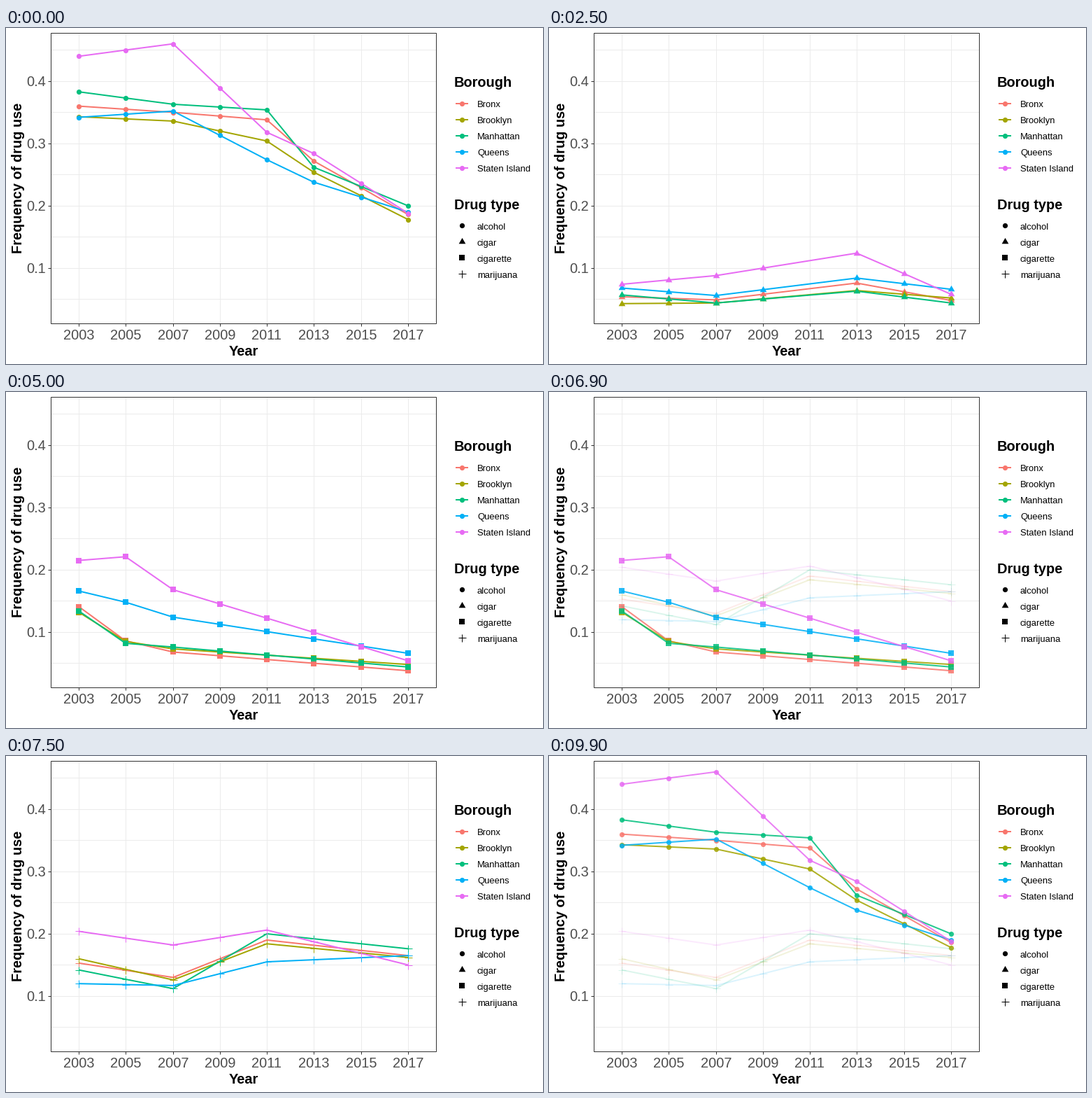
A matplotlib script that plays this animation: 768x480 px, repeating every 10000 ms.

```python
import numpy as np
import matplotlib.pyplot as plt
from matplotlib.animation import FuncAnimation
from matplotlib.patches import Rectangle

WIDTH, HEIGHT, DPI = 768, 480, 96
FRAMES, INTERVAL = 100, 100
HOLD, FADE = 18, 7          # frames at rest, frames of cross-fade
PT = 72 / DPI               # points per pixel
LEFT, RIGHT, TOP, BOTTOM = 64, 615, 7, 422

BOROUGHS = {
    "Bronx": "#F8766D",
    "Brooklyn": "#A3A500",
    "Manhattan": "#00BF7D",
    "Queens": "#00B0F6",
    "Staten Island": "#E76BF3",
}
YEARS = np.arange(2003, 2018, 2)

# Turning points of each trend in thousandths, one row per borough;
# the years between them lie on straight lines.
ALCOHOL = (2003, 2007, 2011, 2013, 2017), [
    (360, 350, 338, 272, 186),
    (343, 336, 304, 254, 178),
    (383, 363, 354, 262, 200),
    (342, 352, 274, 238, 190),
    (440, 460, 318, 284, 188),
]
CIGAR = (2003, 2007, 2013, 2017), [
    (54, 49, 76, 48),
    (43, 44, 64, 52),
    (57, 44, 63, 44),
    (68, 56, 84, 66),
    (74, 88, 124, 58),
]
CIGARETTE = (2003, 2005, 2007, 2017), [
    (141, 86, 68, 38),
    (132, 85, 73, 48),
    (134, 82, 76, 44),
    (166, 148, 124, 66),
    (215, 221, 168, 54),
]
MARIJUANA = (2003, 2007, 2011, 2017), [
    (153, 130, 190, 165),
    (160, 126, 184, 162),
    (142, 112, 200, 176),
    (120, 117, 155, 165),
    (204, 182, 206, 150),
]

TRIANGLE = [(0, 5.6), (-4.85, -2.8), (4.85, -2.8), (0, 5.6)]
DRUGS = {
    "alcohol": (ALCOHOL, dict(marker="o", ms=7.2 * PT, mew=0)),
    "cigar": (CIGAR, dict(marker=TRIANGLE, ms=11.2 * PT, mew=0)),
    "cigarette": (CIGARETTE, dict(marker="s", ms=8 * PT, mew=0)),
    "marijuana": (MARIJUANA, dict(marker="+", ms=11 * PT, mew=PT)),
}

plt.rcParams["font.family"] = "Liberation Sans"
fig = plt.figure(figsize=(WIDTH / DPI, HEIGHT / DPI), dpi=DPI, facecolor="white")
ax = fig.add_axes([0, 0, 1, 1])
ax.set_xlim(0, WIDTH)
ax.set_ylim(HEIGHT, 0)
ax.axis("off")


def year_x(year):
    return np.floor(104.5 + (year - 2003) / 14 * 471)


def freq_y(freq):
    return 432 - 890 * freq


def stroke(x, y, color, width=1, z=1):
    return ax.plot(x, y, color=color, lw=width * PT, zorder=z,
                   solid_capstyle="butt", solid_joinstyle="round")[0]


def points(x, y, color, style):
    return ax.plot(x, y, ls="none", color=color, zorder=4, **style)[0]


def label(x, y, text, size=20, color="black", **kw):
    ax.text(x, y, text, fontsize=size * PT, color=color, va="baseline", **kw)


def draw_panel():
    for freq in np.arange(0.05, 0.46, 0.05):
        y = np.floor(freq_y(freq) + 0.01)
        stroke([LEFT, RIGHT], [y, y], "#EBEBEB")
    for year in YEARS:
        x = year_x(year)
        stroke([x, x], [TOP, BOTTOM], "#EBEBEB")
        stroke([x, x], [BOTTOM, BOTTOM + 4], "#333333")
        label(x, 445, str(year), color="#4D4D4D", ha="center")
    for freq in (0.1, 0.2, 0.3, 0.4):
        y = freq_y(freq)
        stroke([LEFT - 4, LEFT], [y, y], "#333333")
        label(57, y + 7, f"{freq:.1f}", color="#4D4D4D", ha="right")
    ax.add_patch(Rectangle((LEFT, TOP), RIGHT - LEFT, BOTTOM - TOP, fill=False,
                           ec="#333333", lw=PT, zorder=6))
    label(339.5, 468, "Year", weight="bold", ha="center")
    label(23.5, 214.5, "Frequency of drug use", weight="bold", ha="center",
          rotation=90, rotation_mode="anchor")


def draw_legends():
    label(641, 84, "Borough", weight="bold")
    for i, (name, color) in enumerate(BOROUGHS.items()):
        y = 108 + 23 * i
        stroke([643, 661], [y, y], color, 2)
        points([652], [y], color, DRUGS["alcohol"][1])
        label(674, y + 5, name, 13)
    label(641, 259, "Drug type", weight="bold")
    for i, (name, (_, style)) in enumerate(DRUGS.items()):
        y = 282 + 23 * i
        points([652], [y], "black", style)
        label(674, y + 6, name, 13)


def draw_drug(name):
    (key_years, rows), style = DRUGS[name]
    # Cigars were left out of the 2011 survey.
    years = YEARS[YEARS != 2011] if name == "cigar" else YEARS
    x = year_x(years)
    artists = []
    for row, color in zip(rows, BOROUGHS.values()):
        y = freq_y(np.interp(years, key_years, row) / 1000)
        artists += [stroke(x, y, color, 2, z=3), points(x, y, color, style)]
    return artists


draw_panel()
draw_legends()
layers = [draw_drug(name) for name in DRUGS]


def update(frame):
    current, step = divmod(frame, FRAMES // len(layers))
    fade = max(0, step - HOLD) / FADE
    alphas = [0] * len(layers)
    alphas[current] = 1 - fade
    alphas[(current + 1) % len(layers)] = fade
    for artists, alpha in zip(layers, alphas):
        for artist in artists:
            artist.set_alpha(alpha)
            artist.set_visible(alpha > 0)
    return [artist for artists in layers for artist in artists]


anim = FuncAnimation(fig, update, frames=FRAMES, interval=INTERVAL,
                     repeat=True, repeat_delay=0, blit=False)
plt.show()
```
